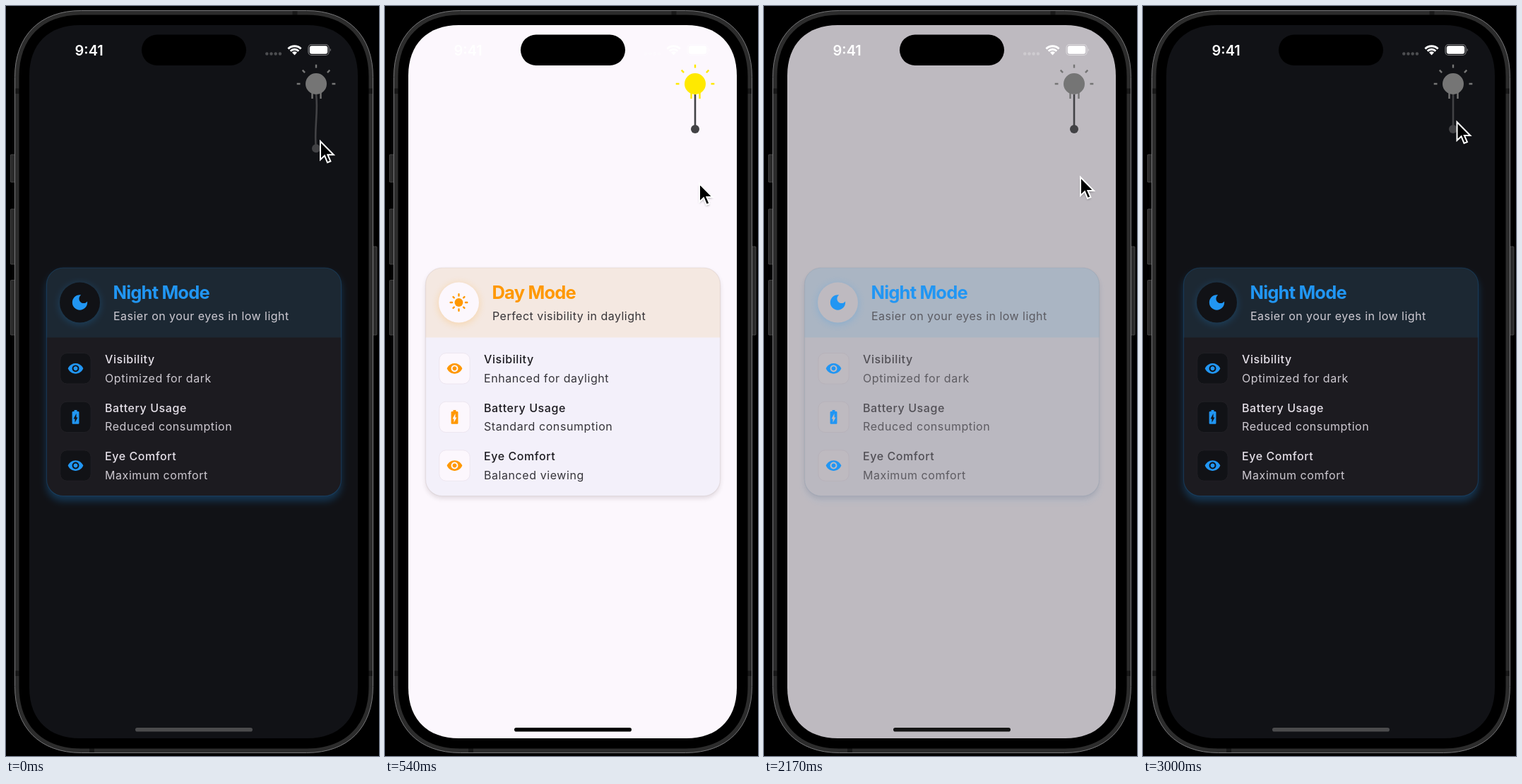
Write an HTML page that moves like this. It is 528 px wide and 1060 px high and loops after 3.04 s.

```html
<!DOCTYPE html>
<html lang="en">
<head>
<meta charset="utf-8">
<title>Lamp theme switch</title>
<style>
  html, body { margin: 0; width: 100%; height: 100%; overflow: hidden; background: #000; }
  svg { display: block; width: 100%; height: 100%; font-family: Inter, "Liberation Sans", sans-serif; }
  .bg { fill: var(--bg); }
  .card { fill: var(--card); }
  .accent { fill: var(--accent); }
  .copy { fill: var(--text); font-size: 16px; letter-spacing: .57px; }
  .name { font-weight: 500; }
  .soft { opacity: .88; }
  .tile { fill: var(--bg); stroke: var(--line); }
  #title { font-size: 25.5px; font-weight: 700; letter-spacing: -.8px; }
  #sub { letter-spacing: .48px; }
  #header { fill: var(--tint); opacity: .1; }
  #home { fill: var(--home); }
  .blur { filter: blur(5.5px); }
  .drop { filter: blur(3px); }
</style>
</head>
<body>
<svg id="stage" viewBox="0 0 528 1060">
  <defs>
    <path id="eye" fill-rule="evenodd" d="M12 4.5C7 4.5 2.73 7.61 1 12c1.73 4.39 6 7.5 11 7.5s9.27-3.11 11-7.5c-1.73-4.39-6-7.5-11-7.5zM12 17c-2.76 0-5-2.24-5-5s2.24-5 5-5 5 2.24 5 5-2.24 5-5 5zm0-8c-1.66 0-3 1.34-3 3s1.34 3 3 3 3-1.34 3-3-1.34-3-3-3z"/>
    <path id="cell" fill-rule="evenodd" d="M15.67 4H14V2h-4v2H8.33C7.6 4 7 4.6 7 5.33v15.33C7 21.4 7.6 22 8.33 22h7.33c.74 0 1.34-.6 1.34-1.33V5.33C17 4.6 16.4 4 15.67 4zM11 20v-5.5H9L13 7v5.5h2L11 20z"/>
    <path id="arrow" d="M0 0V26L6 20.200 10 30 14.400 28.200 10.400 19H18.800Z"/>
    <rect id="panel" x="57.500" y="370" width="417" height="322.500" rx="23.500"/>
    <clipPath id="cardClip"><use href="#panel"/></clipPath>
  </defs>
  <rect width="528" height="1060"/>

  <g fill="#2a2a2a" stroke="#505050" stroke-width=".8">
    <rect x="6.400" y="210" width="8" height="39" rx="1"/>
    <rect x="6.400" y="287" width="8" height="78" rx="1"/>
    <rect x="6.400" y="387.500" width="8" height="77.500" rx="1"/>
    <rect x="517" y="340" width="8" height="125" rx="1"/>
  </g>
  <path id="shell" fill="#2c2c2c" stroke="#777779"/>
  <path fill="#191919" d="M405.500 7h7v6h-7zM118 1049h7v6h-7zM13 116.500h6v7.500h-6zM13 939.500h6v7.500h-6zM513 116.500h6v7.500h-6zM513 939.500h6v7.500h-6z"/>
  <path id="bezel"/>
  <path id="screen" class="bg"/>
  <rect x="192" y="40.500" width="148" height="43.500" rx="21.750"/>

  <g fill="#fff">
    <text x="97.500" y="69.500" font-size="20" font-weight="600">9:41</text>
    <g id="dots" opacity=".25"></g>
    <path d="M408.500 69.500l-3.500-3.700a5 5 0 0 1 7 0z"/>
    <path id="wifi" fill="none" stroke="#fff" stroke-width="2.900"/>
    <rect x="428" y="54.500" width="29" height="15" rx="4.500" fill="none" stroke="#fff" stroke-opacity=".45" stroke-width="1.200"/>
    <rect x="429.800" y="56.300" width="25.400" height="11.400" rx="3"/>
    <path d="M458.600 59.800a2.700 2.700 0 0 1 0 4.600z" opacity=".45"/>
  </g>

  <g id="night"><use href="#panel" y="7" class="blur" fill="#2196f3" opacity=".28"/></g>
  <g id="day"><use href="#panel" y="3.500" class="drop" fill="#402830" opacity=".14"/></g>
  <g clip-path="url(#cardClip)">
    <rect class="card" x="57" y="369" width="418" height="324"/>
    <rect id="header" x="57" y="369" width="418" height="99.500"/>
  </g>
  <g fill="none" stroke-width="1.200">
    <use id="nightEdge" href="#panel" stroke="#2196f3"/>
    <use id="dayEdge" href="#panel" stroke="#8a7060"/>
  </g>

  <circle class="accent blur" cx="104.500" cy="421" r="28.500" opacity=".25"/>
  <circle class="bg" cx="104.500" cy="419" r="28.500"/>
  <g transform="translate(90.3 404.8) scale(1.183)">
    <path id="moon" class="accent" d="M12 3c-4.97 0-9 4.03-9 9s4.03 9 9 9 9-4.03 9-9c0-.46-.04-.92-.1-1.36-.98 1.37-2.58 2.26-4.4 2.26-2.98 0-5.4-2.42-5.4-5.4 0-1.81.89-3.42 2.26-4.4-.44-.06-.9-.1-1.36-.1z"/>
    <g id="sun" class="accent">
      <circle cx="12" cy="12" r="5"/>
      <path id="sunRays" stroke="#ff9800" stroke-width="2" stroke-linecap="round"/>
    </g>
  </g>
  <text id="title" class="accent" x="151.500" y="414.300"></text>
  <text id="sub" class="copy soft" x="152" y="444"></text>
  <g id="rows"></g>

  <rect id="home" x="183" y="1020" width="166" height="5.600" rx="2.800"/>

  <g id="lamp">
    <circle cx="439" cy="110" r="15" stroke="none"/>
    <path id="lampRays" stroke-width="2.400"/>
    <path d="M433.500 121v10M445.500 121v10" stroke-width="2.400"/>
  </g>
  <path id="rope" fill="none" stroke="#424245" stroke-width="2.600"/>
  <circle id="knob" cx="439" r="6" fill="#424245"/>

  <g id="cursor">
    <use href="#arrow" y="2" opacity=".3" style="filter:blur(1.5px)"/>
    <use href="#arrow" stroke="#fff" stroke-width="2"/>
  </g>
</svg>

<script>
const $ = id => document.getElementById(id);
const LOOP = 3040, REST = 174, TOP = 125;
const DAY_AT = 365, NIGHT_AT = 2120;

// [time, value] steps, linear between them
const knobY = [[0, 201], [280, 261], [320, 261], [355, REST], [1130, REST], [1400, 179],
  [1580, 184], [1670, 190], [1990, 249], [2075, 249], [2112, REST]];
const tipX = [[0, 445], [540, 445], [1710, 445], [2000, 448], [2290, 448], [2700, 446], [2840, 446], [3000, 444.5]];
const tipY = [[0, 191], [280, 251], [545, 251], [650, 225], [800, 182], [920, 167], [1130, 167], [1400, 172],
  [1580, 177], [1670, 183], [1990, 242], [2290, 242], [2400, 222], [2580, 170], [2720, 152.5], [2840, 152.5], [3000, 164]];
const light = [[0, 0], [DAY_AT, 0], [540, 1], [NIGHT_AT, 1], [2313, 0]];

// [night, day]
const tones = {
  bg: [[17, 18, 22], [252, 247, 253]],
  card: [[28, 27, 32], [243, 240, 250]],
  text: [[230, 225, 233], [28, 27, 32]],
  line: [[33, 32, 37], [237, 230, 240]],
  home: [[75, 75, 77], [0, 0, 0]]
};
const modes = {
  night: {
    accent: "#2196f3", tint: "#24a0da", lamp: "#757575",
    words: ["Night Mode", "Easier on your eyes in low light", "Optimized for dark", "Reduced consumption", "Maximum comfort"]
  },
  day: {
    accent: "#ff9800", tint: "#ff9800", lamp: "#ffe900",
    words: ["Day Mode", "Perfect visibility in daylight", "Enhanced for daylight", "Standard consumption", "Balanced viewing"]
  }
};

const setVar = (name, value) => $("stage").style.setProperty("--" + name, value);

function at(steps, t) {
  const i = steps.findIndex(s => s[0] > t);
  if (i < 0) return steps[steps.length - 1][1];
  const [t0, a] = steps[i - 1], [t1, b] = steps[i];
  return a + (b - a) * (t - t0) / (t1 - t0);
}

// Rounded rectangle whose corners ease slightly into the sides
function smoothRect(x, y, w, h, radius) {
  const r = x + w, b = y + h, e = radius * 1.1, c = e * .377;
  return `M${x} ${y + e}C${x} ${y + c} ${x + c} ${y} ${x + e} ${y}H${r - e}` +
    `C${r - c} ${y} ${r} ${y + c} ${r} ${y + e}V${b - e}` +
    `C${r} ${b - c} ${r - c} ${b} ${r - e} ${b}H${x + e}` +
    `C${x + c} ${b} ${x} ${b - c} ${x} ${b - e}Z`;
}

function ray(cx, cy, deg, r0, r1) {
  const a = deg * Math.PI / 180, c = Math.cos(a), s = Math.sin(a);
  return `M${cx + r0 * c} ${cy + r0 * s}L${cx + r1 * c} ${cy + r1 * s}`;
}

function build() {
  $("shell").setAttribute("d", smoothRect(12.5, 6.5, 507, 1049, 85.5));
  $("bezel").setAttribute("d", smoothRect(18.5, 12.5, 495, 1037, 79.5));
  $("screen").setAttribute("d", smoothRect(33, 27, 465, 1008, 65));
  $("dots").innerHTML = [0, 1, 2, 3].map(i => `<circle cx="${369.3 + 6.2 * i}" cy="67.500" r="2.200"/>`).join("");
  $("wifi").setAttribute("d", [8.2, 12.8].map(r => {
    const d = r * Math.SQRT1_2;
    return `M${408.5 - d} ${69.5 - d}A${r} ${r} 0 0 1 ${408.5 + d} ${69.5 - d}`;
  }).join(""));
  $("sunRays").setAttribute("d", [0, 1, 2, 3, 4, 5, 6, 7].map(i => ray(12, 12, i * 45, 8, i % 2 ? 9.5 : 10)).join(""));
  $("lampRays").setAttribute("d", [0, 1, 2, 3, 4].map(i => ray(439, 110, -45 * i, 22.5, 27.3)).join(""));
  $("rows").innerHTML = [["Visibility", "eye"], ["Battery Usage", "cell"], ["Eye Comfort", "eye"]].map(([name, icon], i) =>
    `<g transform="translate(0 ${68.6 * i})">
      <rect class="tile" x="76.800" y="490.600" width="43.400" height="43.400" rx="9.500"/>
      <use href="#${icon}" class="accent" transform="translate(86.700 500.500) scale(.986)"/>
      <text class="copy name" x="140" y="505.200">${name}</text>
      <text class="copy soft detail" x="140" y="531.500"></text>
    </g>`).join("");
}

let mode = "";
function setMode(next) {
  if (next === mode) return;
  mode = next;
  const { accent, tint, lamp, words: [title, sub, ...details] } = modes[mode];
  $("title").textContent = title;
  $("sub").textContent = sub;
  document.querySelectorAll(".detail").forEach((el, i) => el.textContent = details[i]);
  setVar("accent", accent);
  setVar("tint", tint);
  $("sun").style.display = mode === "day" ? "" : "none";
  $("moon").style.display = mode === "day" ? "none" : "";
  $("lamp").setAttribute("fill", lamp);
  $("lamp").setAttribute("stroke", lamp);
}

function draw(t) {
  setMode(t >= DAY_AT && t < NIGHT_AT ? "day" : "night");

  const p = at(light, t);
  for (const [key, [a, b]] of Object.entries(tones))
    setVar(key, `rgb(${a.map((v, i) => Math.round(v + (b[i] - v) * p))})`);
  $("night").style.opacity = 1 - p;
  $("day").style.opacity = p;
  $("nightEdge").style.opacity = .19 * (1 - p);
  $("dayEdge").style.opacity = .12 * p;

  // The cord waves while slack and straightens as it is stretched
  const y = at(knobY, t), len = y - TOP;
  const pull = Math.min(30, Math.max(0, y - REST));
  const wave = 11.5 * Math.sin(Math.PI * pull / 30);
  $("rope").setAttribute("d", `M439 ${TOP}C${439 + wave} ${TOP + len / 3} ${439 - wave} ${TOP + len * 2 / 3} 439 ${y}`);
  $("knob").setAttribute("cy", y);
  $("cursor").setAttribute("transform", `translate(${at(tipX, t)} ${at(tipY, t)})`);
}

build();
draw(0);
const start = performance.now();
function tick() {
  draw((performance.now() - start) % LOOP);
  requestAnimationFrame(tick);
}
requestAnimationFrame(tick);
</script>
</body>
</html>
```
